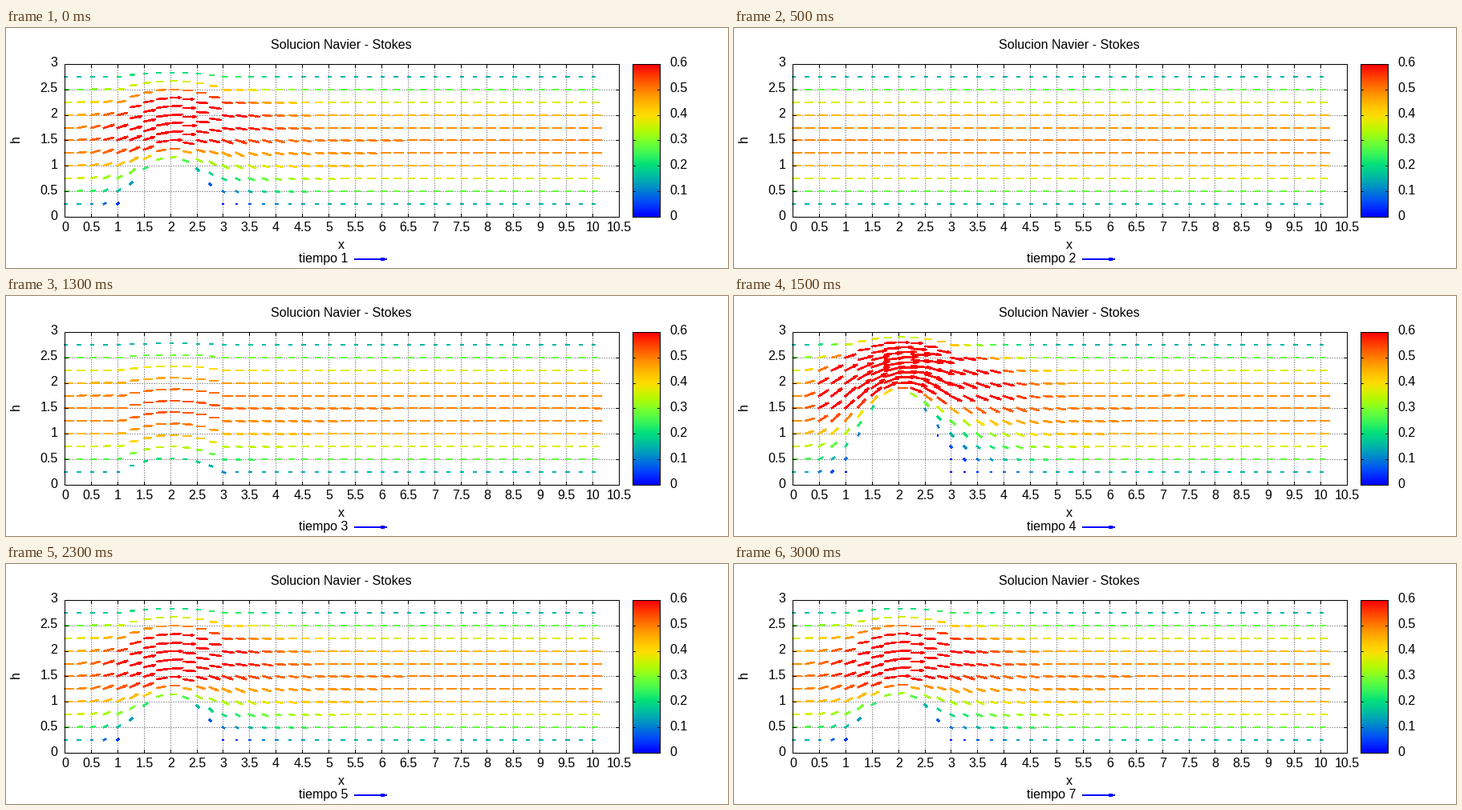
Animation of 900x300 px, one loop 3500 ms. Source, as a matplotlib script:

```python
import numpy as np
import matplotlib.pyplot as plt
from matplotlib.animation import FuncAnimation
from matplotlib.collections import LineCollection
from matplotlib.colors import LinearSegmentedColormap
from matplotlib.patches import Rectangle

W, H, DPI = 900, 300, 100
PX = 72 / DPI                              # one pixel in points
LEFT, RIGHT, TOP, BOTTOM = 73, 764, 45, 236
XMAX, YMAX, VMAX = 10.5, 3.0, 0.6
BUMPS = [1.0, 0.0, 0.3, 1.8, 0.98, 0.997, 1.0]

# Solver grid: x along the channel, e across it
NX, NE, NU = 81, 25, 0.25
xs, es = np.linspace(0, 10, NX), np.linspace(0, 3, NE)
DX, DE = xs[1], es[1]

cmap = LinearSegmentedColormap("flow", {
    "red": lambda t: np.clip(3 * t - 1, 0, 1),
    "green": lambda t: np.clip(np.sin(np.pi * t), 0, 1),
    "blue": lambda t: np.clip(1.16 - 2 * t, 0, 1)})


def px(x):
    return LEFT + x * (RIGHT - LEFT) / XMAX


def py(y):
    return BOTTOM - y * (BOTTOM - TOP) / YMAX


def inner(below, mid, above):
    """Three-point operator across the channel, zero on the walls."""
    m = (np.diag(np.full(NE, mid)) + np.diag(np.full(NE - 1, above), 1)
         + np.diag(np.full(NE - 1, below), -1))
    m[[0, -1]] = 0
    return m


EYE = inner(0.0, 1.0, 0.0)
D1 = inner(-1.0, 0.0, 1.0) / (2 * DE)
D2 = inner(1.0, -2.0, 1.0) / DE ** 2
ZERO = np.zeros((NE, NE))


def flow(height):
    """Steady channel flow over a parabolic bump (stream function, vorticity)."""
    b = height * np.clip(1 - (xs - 2) ** 2, 0, None)
    slope = np.gradient(b, DX)[:, None]
    q = 1 / (1 - b[:, None] / 3)
    p = -slope * (1 - es / 3) * q
    r = np.gradient(p, DX, axis=0) + p * slope * q / 3
    k = p ** 2 + q ** 2

    psi_in = (es ** 2 / 2 - es ** 3 / 9) * 2 / 3
    omega_in = -(1 - 2 * es / 3) * 2 / 3
    ends = np.concatenate([psi_in, omega_in])
    rhs = np.zeros(2 * NE)
    rhs[NE - 1] = 1
    psi = np.tile(psi_in, (NX, 1))

    # The inflow is purely horizontal, so its vorticity follows the next column
    inlet = np.block([[ZERO, ZERO], [-2 / DX ** 2 * EYE, ZERO]])
    start = ends - inlet @ ends

    for _ in range(8):
        across = q * np.gradient(psi, DE, axis=1)
        along = q * np.gradient(psi, DX, axis=0)
        gain, part = [inlet], [start]
        for i in range(1, NX - 1):
            mid = -2 / DX ** 2 * EYE + k[i][:, None] * D2 + r[i][:, None] * D1
            skew = p[i][:, None] * D1 / DX
            nxt, prv = EYE / DX ** 2 + skew, EYE / DX ** 2 - skew
            carry = across[i][:, None] * EYE / (2 * DX)
            m = np.block([[mid, EYE],
                          [ZERO, NU * mid + along[i][:, None] * D1]])
            fwd = np.block([[nxt, ZERO], [ZERO, NU * nxt - carry]])
            back = np.block([[prv, ZERO], [ZERO, NU * prv + carry]])
            for wall, near in ((0, 1), (NE - 1, NE - 2)):
                c = 2 * k[i, wall] / DE ** 2
                m[wall, wall] = m[NE + wall, NE + wall] = 1
                m[NE + wall, near], m[NE + wall, wall] = c, -c
            m += back @ gain[-1]
            free = rhs - back @ part[-1]
            sol = np.linalg.solve(m, np.column_stack([-fwd, free]))
            gain.append(sol[:, :-1])
            part.append(sol[:, -1])
        w = ends
        for i in range(NX - 2, 0, -1):
            w = gain[i] @ w + part[i]
            psi[i] = w[:NE]

    d_e = np.gradient(psi, DE, axis=1)
    u = q * d_e
    v = -(np.gradient(psi, DX, axis=0) + p * d_e)
    v[0] = 0
    y = b[:, None] + es / q
    x = np.repeat(xs[:, None], NE, axis=1)
    return [f[::2, 2:-1:2].ravel() for f in (x, y, u, v)]


def arrow(tail, tip):
    """Shaft and open head on whole pixels."""
    tail, tip = np.round(tail) - 0.5, np.round(tip) - 0.5
    d = tip - tail
    length = np.hypot(*d)
    if length == 0:
        return [np.array([tail, tip + [0.5, 0]])] * 2
    back = d / length * min(0.3 * length, 6.5)
    side = np.array([-back[1], back[0]]) * np.tan(np.radians(15))
    head = [tip - np.trunc(back + side), tip, tip - np.trunc(back - side)]
    return [np.array([tail, tip]), np.array(head)]


def field(height):
    x, y, u, v = flow(height)
    tails = np.column_stack([px(x), py(y)])
    tips = np.column_stack([px(x + u / 3), py(y + v / 3)])
    segs = [s for a, c in zip(tails, tips) for s in arrow(a, c)]
    speed = np.clip(np.hypot(u, v) / VMAX, 0, 1)
    return segs, np.repeat(cmap(speed), 2, axis=0)


fig = plt.figure(figsize=(W / DPI, H / DPI), dpi=DPI, facecolor="white")
ax = fig.add_axes([0, 0, 1, 1])
ax.axis("off")


def line(xa, ya, xb, yb, **kw):
    style = dict(color="black", lw=PX, antialiased=False, snap=False, zorder=4)
    style.update(kw)
    ax.plot([xa, xb], [ya, yb], **style)


def label(x, y, s, ha="center", **kw):
    return ax.text(x, y, s, ha=ha, va=kw.pop("va", "baseline"),
                   family="Liberation Sans", size=16 * PX, **kw)


def box(x0, x1):
    ax.add_patch(Rectangle((x0, TOP), x1 - x0, BOTTOM - TOP, fill=False,
                           ec="black", lw=PX, antialiased=False, snap=False,
                           zorder=4))


grid = dict(color="#a0a0a0", linestyle=(0, (2, 2)), zorder=1,
            dash_capstyle="butt")
for t in np.arange(0, 10.6, 0.5):
    x = round(px(t))
    if 0 < t < XMAX:
        line(x, BOTTOM, x, TOP, **grid)
    line(x, BOTTOM, x, BOTTOM - 4)
    line(x, TOP, x, TOP + 4)
    label(x, 254, f"{t:g}")
for t in np.arange(0, 3.1, 0.5):
    y = round(py(t))
    if 0 < t < YMAX:
        line(LEFT, y, RIGHT, y, **grid)
    line(LEFT, y, LEFT + 4, y)
    line(RIGHT, y, RIGHT - 4, y)
    label(64, y + 3, f"{t:g}", ha="right")
box(LEFT, RIGHT)

# Colour bar
BAR0, BAR1 = 781, 815
ax.imshow(np.linspace(1, 0, 192)[:, None], cmap=cmap, aspect="auto",
          extent=(BAR0, BAR1, BOTTOM, TOP), interpolation="nearest", zorder=2)
for n in range(7):
    y = round(BOTTOM - n * (BOTTOM - TOP) / 6)
    line(BAR0, y, BAR0 + 3, y)
    line(BAR1, y, BAR1 - 3, y)
    label(827, y + 3, f"{n / 10:g}", ha="left")
box(BAR0, BAR1)
ax.set(xlim=(-0.5, W - 0.5), ylim=(H - 0.5, -0.5))

label(417, 26, "Solucion Navier - Stokes")
label(417, 276, "x")
label(12, 138, "h", va="center", rotation=90)
key = label(426, 292, "", ha="right")


def arrows(segs, colors):
    lc = LineCollection(segs, colors=colors, linewidths=[1.6 * PX, 1.2 * PX],
                        antialiaseds=False, capstyle="projecting",
                        joinstyle="round", zorder=3)
    lc.set_snap(False)
    ax.add_collection(lc, autolim=False)
    return lc


arrows(arrow(np.array([435, 289]), np.array([474, 289])), "blue")
fields = [field(h) for h in BUMPS]
vectors = arrows(*fields[0])


def update(n):
    segs, colors = fields[n]
    vectors.set_segments(segs)
    vectors.set_color(colors)
    key.set_text(f"tiempo {n + 1}")
    return vectors, key


anim = FuncAnimation(fig, update, frames=len(BUMPS), interval=500,
                     repeat=True, repeat_delay=0)
plt.show()
```
